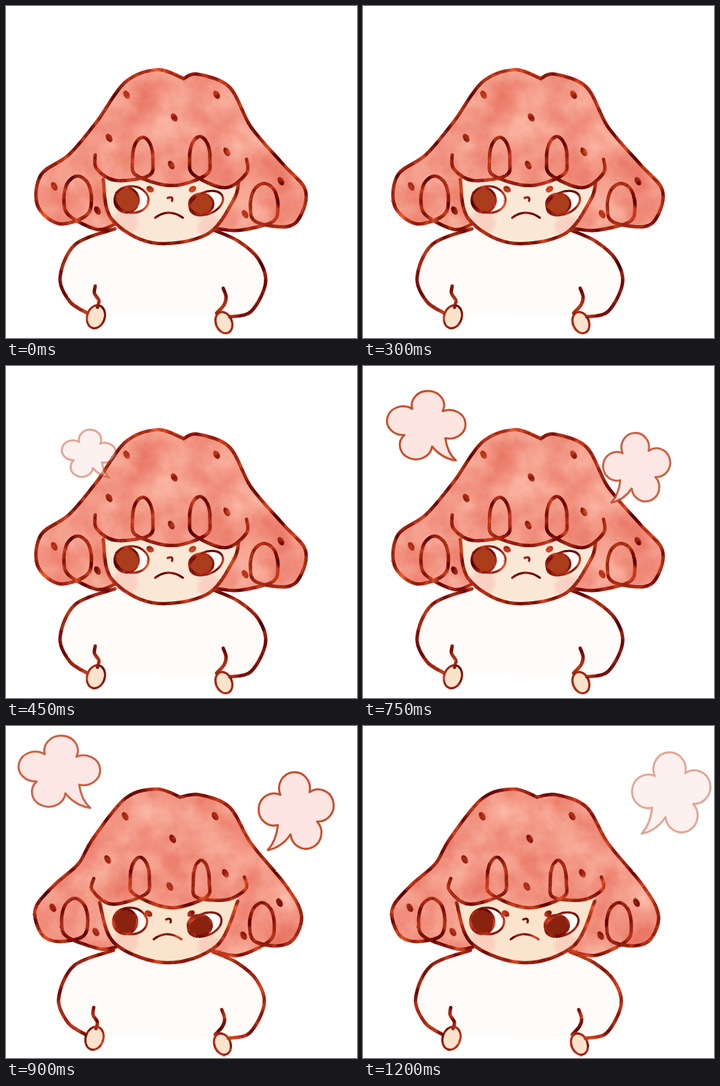
Recreate the animation shown at these times as an HTML page. Size 480 px wide and 453 px high, loop 1350 ms.

```html
<!DOCTYPE html>
<html lang="en">
<head>
<meta charset="utf-8">
<title>Sulking strawberry</title>
<style>
html, body { margin: 0; width: 100%; height: 100%; overflow: hidden; background: #fff; }
svg { display: block; width: 100%; height: 100%; }
.ink { fill: none; stroke: #9c2412; stroke-width: 4.7; stroke-linecap: round; stroke-linejoin: round; }
.thin { stroke-width: 3; }
.dot { fill: #9c2412; stroke: none; }
.cloud { fill: #fde5e2; stroke: #c74e2b; stroke-width: 2.8; stroke-linejoin: round; vector-effect: non-scaling-stroke; }
</style>
</head>
<body>
<svg id="stage" viewBox="0 0 480 453"></svg>
<script>
const STEP = 150;
const ORDER = 'abaababab';

// Key points; "o" marks a curl given as centre and radii
const poses = {
  a: {
    seed: 3, shift: [0, 0], face: '#fae8d7', pupil: '#ab3d1c', brow: 250,
    hairL: '243,99 207,87 163,104 124,158 86,203 48,230 43,272 72,297 o98,262,19,30 125,305 150,297',
    hairR: '243,99 262,93 306,111 335,165 380,217 409,250 404,284 385,301 o353,271,-19,29 320,306 290,304',
    fringe: '122,203 124,222 150,238 o187,208,14,29 228,245 o265,207,14,29 300,248 329,228 329,209',
    jaw: '133,237 144,290 200,323 274,312 311,265 318,241'
  },
  b: {
    seed: 8, shift: [-2, 2], face: '#fbe4cd', pupil: '#8a2210', brow: 254,
    hairL: '238,97 206,86 163,99 118,155 99,188 64,219 40,250 48,283 70,294 o94,264,18,29 128,304 150,302',
    hairR: '238,97 265,94 306,111 335,160 383,218 404,258 394,290 372,300 o350,270,-17,29 318,313 280,306',
    fringe: '120,208 118,224 145,243 o183,207,13,28 225,248 o267,211,11,28 302,237 328,222 326,206',
    jaw: '128,241 149,297 220,323 288,300 317,239'
  }
};

const armL = '149,304 95,325 74,370 87,403 111,419';
const armR = '285,306 318,321 345,345 355,378 335,417 306,424';
const cuffs = ['122,382 121,392 127,402 125,411', '297,385 301,397 298,408 288,419'];
const hands = [[123, 424, 12, 16, 18], [298, 432, 11, 15, -22]];
const eyes = [[172, 264, 23, 18, 6], [274, 269, 24, 15, -24]];
const cheeks = [[163, 296, 18, 17, 0], [280, 301, 18, 15, 0]];
const berrySeeds = '165,121 288,121 230,152 141,180 302,199 226,217 66,246 376,239 125,279 327,284';

// Each cloud drifts from one centre to another; flip mirrors the tail
const clouds = {
  left: { born: 3, flip: 1, from: [113, 120], to: [59, 44], stretch: [1.13, 1], drag: 1 },
  right: { born: 4, flip: -1, from: [347, 167], to: [422, 92], stretch: [1.08, 1.12], drag: 1.6 }
};
const LIFE = 4;

function curl(cx, cy, rx, ry) {
  return Array.from({ length: 7 }, (_, k) => {
    const a = Math.PI * (.2 + 1.6 * k / 6);
    return [cx + rx * Math.sin(a), cy + ry * Math.cos(a)];
  });
}

const points = text => text.split(' ').flatMap(p =>
  p[0] === 'o' ? curl(...p.slice(1).split(',').map(Number)) : [p.split(',').map(Number)]);

// Smooth curve through the points
function curve(p, start = 'M') {
  let d = start + p[0];
  for (let i = 0; i < p.length - 1; i++) {
    const a = p[i - 1] || p[i], b = p[i], c = p[i + 1], e = p[i + 2] || c;
    const h1 = b.map((v, k) => v + (c[k] - a[k]) / 6);
    const h2 = c.map((v, k) => v - (e[k] - b[k]) / 6);
    d += `C${h1} ${h2} ${c}`;
  }
  return d;
}
const line = text => curve(points(text));
const band = (l, r) => line(l) + curve(points(r).reverse(), 'L') + 'Z';
const path = (d, attrs = '') => `<path d="${d}" ${attrs}/>`;
const oval = ([x, y, rx, ry, turn], attrs = '') =>
  `<ellipse rx="${rx}" ry="${ry}" transform="translate(${x} ${y}) rotate(${turn})" ${attrs}/>`;
const ovals = (list, attrs) => list.map(o => oval(o, attrs)).join('');

// Four equal petals around the centre, with a tail in the gap that remains
function cloudPath() {
  const R = 30, petal = 80, first = 165;
  const dent = k => {
    const a = (first + petal * k) * Math.PI / 180;
    return [R * Math.sin(a), -R * Math.cos(a)];
  };
  const r = R * 2 * Math.sin(petal * Math.PI / 360) * .53;
  let d = 'M' + dent(0);
  for (let k = 1; k <= 4; k++) d += `A${r} ${r} 0 1 1 ${dent(k)}`;
  return d + `Q27 38 38 49Q20 46 ${dent(0)}Z`;
}

// Turbulent colour laid inside the drawn shape, with slightly rough edges
function texture(id, seed, freq, octaves, matrix, rough) {
  return `<filter id="${id}" filterUnits="userSpaceOnUse" x="0" y="0" width="480" height="453" color-interpolation-filters="sRGB">
    <feTurbulence type="fractalNoise" baseFrequency="${freq}" numOctaves="${octaves}" seed="${seed}"/>
    <feColorMatrix values="${matrix} 0 0 0 0 1" result="tint"/>
    <feTurbulence type="fractalNoise" baseFrequency=".25" numOctaves="2" seed="${seed + 1}" result="edge"/>
    <feDisplacementMap in="SourceGraphic" in2="edge" scale="${rough}" xChannelSelector="R" yChannelSelector="G" result="shape"/>
    <feComposite in="tint" in2="shape" operator="in"/>
  </filter>`;
}
const WASH = '.1 0 0 0 .9  .36 0 0 0 .41  .36 0 0 0 .34';
const INK = '.9 0 0 0 .16  .55 0 0 0 -.14  .25 0 0 0 -.06';

function drawPose(id) {
  const p = poses[id];
  const jaw = points(p.jaw);
  const face = curve([...jaw, [300, 222], [225, 212], [146, 222], jaw[0]]);
  const dots = [
    ...points(berrySeeds).map(([x, y]) => [x, y, 4, 6.3, -30]),
    [197, p.brow, 5.5, 4, 30], [255, p.brow, 5.5, 4, -30]
  ];
  const pupils = eyes.map(([x, y, , ry]) => [x - 7, y + 1, 16.5, ry - 1, 0]);
  const move = `transform="translate(${p.shift})"`;
  const wash = `fill="#f5998a" filter="url(#wash-${id})"`;
  return `<defs>
      ${texture('wash-' + id, p.seed, .02, 6, WASH, 1.5)}
      ${texture('ink-' + id, p.seed + 20, .05, 4, INK, 1.6)}
      <clipPath id="face-${id}">${path(face)}</clipPath>
    </defs>
    <g id="pose-${id}">
      <g ${move}>
        ${path(band(armL, armR), 'fill="#fefbf9"')}
        ${ovals(hands, 'fill="#fae3cd"')}
      </g>
      ${path(band(p.hairL, p.hairR), wash)}
      ${path(face, `fill="${p.face}"`)}
      <g clip-path="url(#face-${id})">${ovals(cheeks, 'fill="#f8b0a6" opacity=".4" filter="url(#soft)"')}</g>
      ${path(line(p.fringe) + 'Z', wash)}
      <g ${move}>
        ${ovals(eyes, 'fill="#fffdfb"')}
        ${ovals(pupils, `fill="${p.pupil}"`)}
      </g>
      <g class="ink" filter="url(#ink-${id})">
        ${[p.hairL, p.hairR, p.fringe, p.jaw].map(l => path(line(l))).join('')}
        <g ${move}>
          ${[armL, armR, ...cuffs].map(l => path(line(l))).join('')}
          ${ovals([...hands, ...eyes, ...pupils], 'class="thin"')}
          ${path('M221 262Q229 259 227 266M204 289Q222 275 242 289', 'class="thin"')}
          ${ovals(dots, 'class="dot"')}
        </g>
      </g>
    </g>`;
}

const stage = document.getElementById('stage');
stage.innerHTML =
  '<defs><filter id="soft" x="-50%" y="-50%" width="200%" height="200%"><feGaussianBlur stdDeviation="2"/></filter></defs>' +
  Object.keys(poses).map(drawPose).join('') +
  Object.keys(clouds).map(k => path(cloudPath(), `id="cloud-${k}" class="cloud"`)).join('');

const $ = id => document.getElementById(id);

function placeCloud(side, step) {
  const { born, flip, from, to, stretch, drag } = clouds[side];
  const el = $('cloud-' + side);
  const t = (step - born) / LIFE;
  const alive = t >= 0 && t <= 1;
  el.style.visibility = alive ? 'visible' : 'hidden';
  if (!alive) return;
  const way = 1 - (1 - t) ** drag;
  const size = 1 - .34 * (1 - t) ** 3;
  const [x, y] = from.map((v, k) => v + (to[k] - v) * way);
  el.setAttribute('transform', `translate(${x} ${y}) scale(${flip * size * stretch[0]} ${size * stretch[1]})`);
  el.setAttribute('opacity', Math.min(1, .5 + .55 * Math.sin(Math.PI * t)));
}

let shown = -1;
function tick() {
  const step = Math.floor(performance.now() / STEP) % ORDER.length;
  if (step !== shown) {
    shown = step;
    for (const id in poses) $('pose-' + id).style.visibility = ORDER[step] === id ? 'visible' : 'hidden';
    for (const side in clouds) placeCloud(side, step);
  }
  requestAnimationFrame(tick);
}
tick();
</script>
</body>
</html>
```
